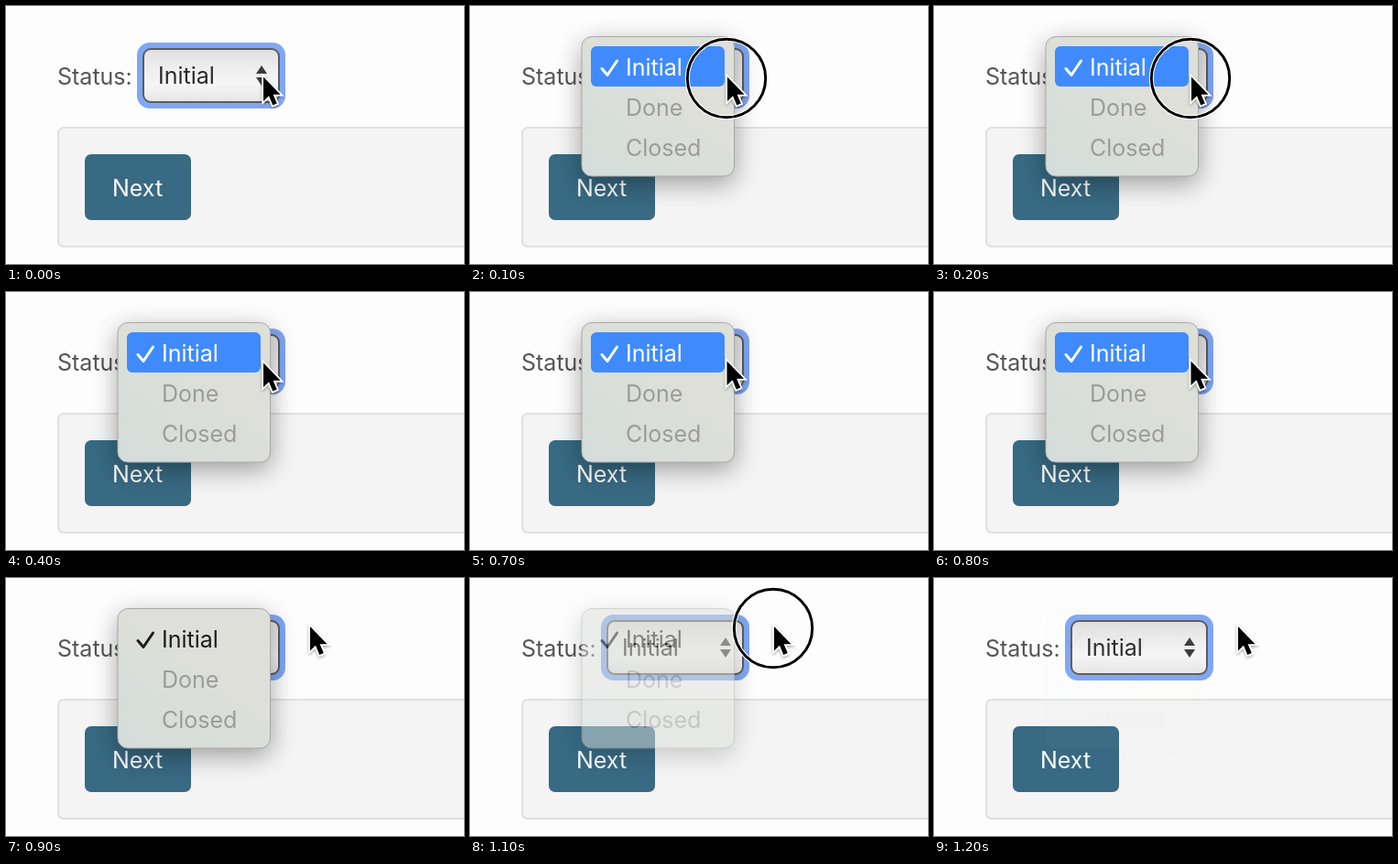
An HTML page for the animation above (1.3 s loop, 500 by 282 pixels).

```html
<!DOCTYPE html>
<html lang="en">
<head>
<meta charset="utf-8">
<title>Status select</title>
<style>
  html, body { margin: 0; width: 100%; height: 100%; overflow: hidden; background: #fdfdfd; }
  svg { display: block; width: 100vw; height: 100vh; }
  text { font: 25px Inter, "Open Sans", sans-serif; }
</style>
</head>
<body>
<svg viewBox="0 0 500 282">
  <defs>
    <linearGradient id="face" x2="0" y2="1">
      <stop offset="0" stop-color="#dedede"/>
      <stop offset=".3" stop-color="#ececec"/>
      <stop offset=".65" stop-color="#f6f6f6"/>
      <stop offset="1" stop-color="#e6e6e6"/>
    </linearGradient>
    <linearGradient id="glass" x1="0" y1="1" x2=".5" y2=".4">
      <stop offset="0" stop-color="#d3dddb"/>
      <stop offset="1" stop-color="#dddfd8"/>
    </linearGradient>
    <filter id="soft" x="-50%" y="-50%" width="200%" height="200%">
      <feGaussianBlur stdDeviation="14"/>
    </filter>
    <filter id="drop" x="-50%" y="-50%" width="200%" height="200%">
      <feDropShadow dx="0" dy="1.5" stdDeviation="1.5" flood-opacity=".35"/>
    </filter>
  </defs>

  <rect width="500" height="282" fill="#fdfdfd"/>
  <text x="56" y="86" fill="#555">Status:</text>
  <rect x="57" y="133" width="480" height="130" rx="6" fill="#f4f4f4" stroke="#e0e0e0" stroke-width="2"/>
  <rect x="86" y="162" width="116" height="72" rx="7" fill="#386a83"/>
  <text x="116" y="208" fill="#fff">Next</text>

  <g id="select">
    <rect x="143" y="40" width="162" height="72" rx="14" fill="#7fa7f5"/>
    <rect x="150" y="47" width="148" height="58" rx="8" fill="url(#face)" stroke="#5c5c5c" stroke-width="2"/>
    <text x="166" y="85" fill="#2b2b2b">Initial</text>
    <path d="M279 65l6 9h-12zM279 87l6-9h-12z" fill="#3a3a3a"/>
  </g>

  <g id="menu">
    <rect x="122" y="41" width="167" height="153" rx="11" opacity=".36" filter="url(#soft)"/>
    <rect x="122" y="33.5" width="166.500" height="152.500" rx="11" fill="url(#glass)" stroke="#a9aaa6"/>
    <rect id="bar" x="132" y="44" width="146" height="44" rx="6" fill="#3f8bfd"/>
    <g id="pick">
      <path d="M144 68.500l6 7L160.500 60" fill="none" stroke="currentColor" stroke-width="3" stroke-linecap="round" stroke-linejoin="round"/>
      <text x="170" y="76" fill="currentColor">Initial</text>
    </g>
    <g fill="#9b9c98">
      <text x="170" y="120">Done</text>
      <text x="170" y="164">Closed</text>
    </g>
  </g>

  <g id="ring" fill="none">
    <circle r="42.700" stroke="#fff" stroke-width="5"/>
    <circle r="42.700" stroke="#000" stroke-width="3"/>
  </g>
  <path id="cursor" filter="url(#drop)" stroke="#fff" stroke-width="3.400" paint-order="stroke"
    d="M0 0V26.500L6 20.800L10.300 31L14.800 29.100L10.600 19.200H18.600Z"/>
</svg>
<script>
  const LOOP = 1300;
  const $ = id => document.getElementById(id);
  const show = (id, alpha) => $(id).setAttribute("opacity", alpha);
  const move = (id, [x, y]) => $(id).setAttribute("transform", `translate(${x} ${y})`);
  const within = (t, from, to) => t >= from && t < to;

  // Value of the last step reached: [[start, value], ...]
  const step = (t, steps) => steps.filter(s => t >= s[0]).pop()[1];

  const menuAlpha = [[0, 0], [100, 1], [1100, 0.5], [1200, 0.025]];
  const cursorAt = [[0, [281, 77.5]], [700, [280.5, 75.5]], [900, [332, 53]]];
  const ringAt = [[0, [280, 79]], [900, [331, 55]]];

  function render(t) {
    const lit = t < 900;
    show("menu", step(t, menuAlpha));
    show("bar", lit ? 1 : 0);
    $("pick").style.color = lit ? "#fff" : "#1d1d1d";
    move("cursor", step(t, cursorAt));
    move("ring", step(t, ringAt));
    show("ring", within(t, 100, 400) || within(t, 1100, 1200) ? 1 : 0);
  }

  const start = performance.now();
  function tick() {
    render((performance.now() - start) % LOOP);
    requestAnimationFrame(tick);
  }
  tick();
</script>
</body>
</html>
```
